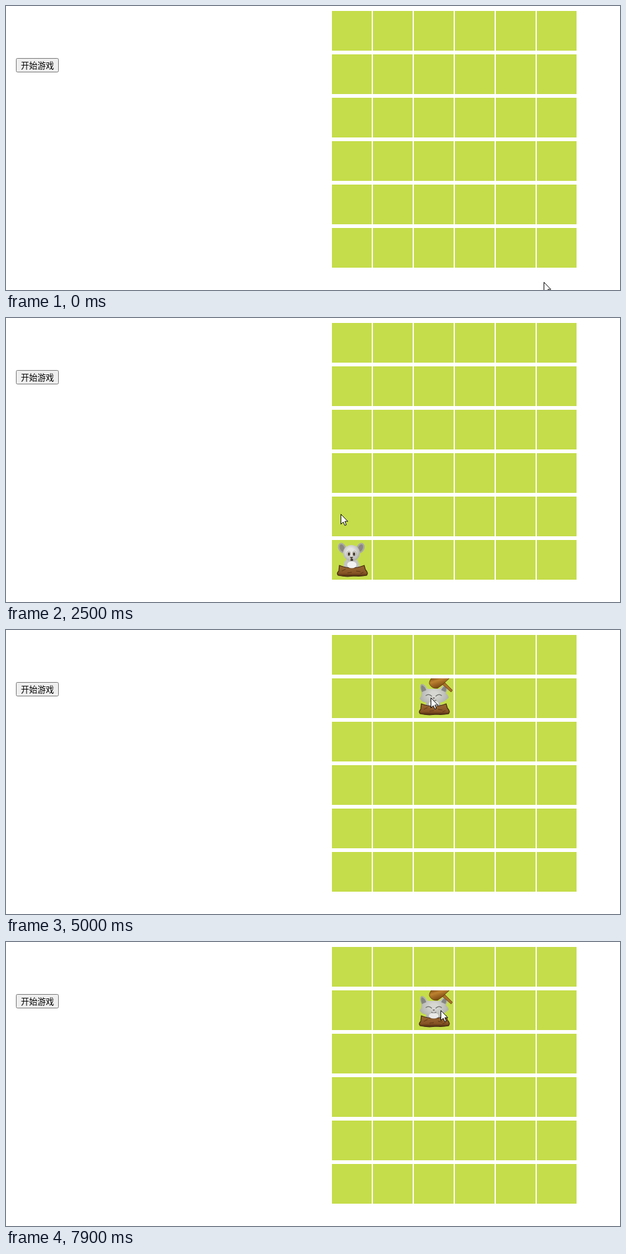
Write an HTML page that moves like this. It is 989x458 px and loops after 7.99 s.

```html
<!DOCTYPE html>
<html lang="zh">
<head>
<meta charset="utf-8">
<style>
html, body { margin: 0; width: 100%; height: 100%; overflow: hidden; background: #fff; }
svg { display: block; width: 989px; height: 458px; }
text { font: 300 13.333px "Noto Sans CJK SC", "Noto Sans CJK", sans-serif; }
</style>
</head>
<body>
<svg viewBox="0 0 989 458">
  <defs>
    <clipPath id="cellClip"><rect width="64" height="64"/></clipPath>
    <radialGradient id="fur" cx=".45" cy=".4" r=".65">
      <stop offset=".3" stop-color="#e4e4e2"/><stop offset="1" stop-color="#a9a9a6"/>
    </radialGradient>
    <radialGradient id="greyFur" cx=".5" cy=".45" r=".6">
      <stop offset=".2" stop-color="#d6d6d3"/><stop offset="1" stop-color="#a8a8a4"/>
    </radialGradient>
    <linearGradient id="soil" x2="0" y2="1">
      <stop offset="0" stop-color="#9a6a34"/><stop offset=".7" stop-color="#875425"/><stop offset="1" stop-color="#4a2a10"/>
    </linearGradient>
    <linearGradient id="wood" x1="0" y1="0" x2=".6" y2="1">
      <stop offset="0" stop-color="#6f3d0c"/><stop offset=".4" stop-color="#bd822f"/><stop offset="1" stop-color="#6b3a0c"/>
    </linearGradient>
    <g id="mound">
      <path d="M12 41Q32 49 52 41L54 48Q59 53 56 57Q46 59 36 58Q22 60 10 57Q7 54 11 50Z" fill="url(#soil)" stroke="#432712" stroke-width="1.2"/>
      <path d="M16 50l6-3M25 53l7-1M39 50l7 1M46 54l5-2" stroke="#5c3814" fill="none"/>
    </g>
  </defs>

  <rect id="button" x="16.5" y="84.5" width="68" height="22" rx="2"/>
  <text x="24" y="101">开始游戏</text>
  <g id="grid" fill="#c5dd4a"></g>

  <g id="mole" clip-path="url(#cellClip)">
    <g id="awake">
      <g fill="#8b8780" stroke="#aaa9a4" stroke-width="2.5">
        <ellipse cx="16.5" cy="13" rx="5" ry="7.5" transform="rotate(-24 16.5 13)"/>
        <ellipse cx="46" cy="13" rx="5" ry="7.5" transform="rotate(24 46 13)"/>
      </g>
      <path d="M19 46Q18 34 24 31H39Q45 35 44 46Z" fill="#c4c4c1"/>
      <ellipse cx="31.5" cy="21" rx="13.5" ry="13" fill="url(#fur)"/>
      <g fill="#f0efe8" stroke="#77736b" stroke-width=".6">
        <ellipse cx="27" cy="22" rx="2.7" ry="4"/><ellipse cx="36" cy="22" rx="2.7" ry="4"/>
      </g>
      <g fill="#3b3021">
        <ellipse cx="27.3" cy="22.5" rx="1.6" ry="2.7"/><ellipse cx="35.7" cy="22.5" rx="1.6" ry="2.7"/>
        <path d="M28.5 27.5h6l-3 3z"/><path d="M30 30.5h4v3h-4z"/>
      </g>
      <use href="#mound"/>
      <ellipse cx="32" cy="40" rx="7.5" ry="5.5" fill="#f3f3f3"/>
    </g>
    <g id="struck">
      <path d="M12 23Q8 12 12 9Q17 8 22 17L42 17Q49 8 53 10Q56 15 52 24Q59 31 54 33Q48 39 42 39L44 46H19L20 39Q12 38 9 32Q12 31 12 23Z" fill="url(#greyFur)"/>
      <path d="M13 22Q10 13 13 11Q18 13 20 19ZM51 22Q54 13 51 12Q46 14 44 19Z" fill="#858581"/>
      <path d="M19 28q5-4 10 1M35 29q5-5 10-1M28 35q4 3 8 0" fill="none" stroke="#6b6b67" stroke-width="1.2"/>
      <path d="M30 31h4l-2 2z" fill="#5a5048"/>
      <use href="#mound"/>
      <ellipse cx="32" cy="41" rx="8" ry="4.5" fill="#e9e9e7"/>
      <path d="M47 4l15 15-2 3-16-14z" fill="#a8702b" stroke="#6d420f" stroke-width=".8"/>
      <path d="M30-2Q24 4 25 9Q29 17 38 16L45 11L57 0V-2Z" fill="url(#wood)" stroke="#5a330d" stroke-width=".8"/>
    </g>
  </g>

  <circle id="flash" r="12" fill="#ffee00" fill-opacity=".5"/>
  <path id="cursor" d="M.5.5V16.5L4.2 13L6.8 18.5L9.2 17.5L6.8 12H11.6Z" fill="#fff" stroke="#000"/>
</svg>
<script>
const LOOP = 7990, UPDATE = 78.33;
const FIRST_POP = 2080, POP_EVERY = 1000, PRESS_TIME = 130, START_PRESS = 960;
const $ = id => document.getElementById(id);

const cellX = i => 525 + 66 * (i % 6);
const cellY = i => 8 + 70 * Math.floor(i / 6);

function set(id, attributes) {
  for (const name in attributes) $(id).setAttribute(name, attributes[name]);
}
const show = (id, on) => set(id, { visibility: on ? 'visible' : 'hidden' });
const place = (id, x, y) => set(id, { transform: `translate(${x} ${y})` });

$('grid').innerHTML = Array.from({ length: 36 }, (_, i) =>
  `<rect x="${cellX(i)}" y="${cellY(i)}" width="64" height="64"/>`).join('');

// one mole per POP_EVERY, struck when its press is released
const moles = [
  { cell: 30, press: 2830 }, { cell: 10, press: 3830 }, { cell: 8, press: 4790 },
  { cell: 31, press: 5780 }, { cell: 3, press: 6910 }, { cell: 8, press: 7590 }
];

// the pointer rests between moves
const home = { x: 866, y: 445 };
const moves = [
  { from: 20, to: 860, x: 57, y: 104 },
  { from: 1090, to: 1800, x: 434, y: 98 },
  { from: 1800, to: 2820, x: 570, y: 380 },
  { from: 3125, to: 3680, x: 809, y: 103 },
  { from: 4240, to: 4700, x: 684, y: 109 },
  { from: 5320, to: 5780, x: 616, y: 386 },
  { from: 5950, to: 6815, x: 740, y: 46 },
  { from: 7055, to: 7590, x: 702, y: 102 },
  { from: 7830, to: 7905, x: 700, y: 110 }
];

const ease = u => u * u * (3 - 2 * u);

function pointerAt(t) {
  let { x, y } = home;
  for (const move of moves) {
    const u = ease(Math.min(1, Math.max(0, (t - move.from) / (move.to - move.from))));
    x += (move.x - x) * u;
    y += (move.y - y) * u;
  }
  return [Math.round(x), Math.round(y)];
}

function draw(ms) {
  // the picture advances in discrete screen updates
  const t = Math.min(101, Math.floor((ms + 18) / UPDATE)) * UPDATE;
  const [x, y] = pointerAt(t);
  const pressed = [START_PRESS, ...moles.map(m => m.press)].some(p => t >= p && t < p + PRESS_TIME);
  place('cursor', x, y);
  place('flash', x, y);
  show('flash', pressed);

  const over = x >= 16 && x < 85 && y >= 84 && y < 107;
  const [fill, stroke] = !over ? ['#efefef', '#767676'] : pressed ? ['#f5f5f5', '#8d8d8d'] : ['#e5e5e5', '#4f4f4f'];
  set('button', { fill, stroke });

  const mole = moles[Math.floor((t - FIRST_POP) / POP_EVERY)];
  const hit = mole && t >= mole.press + PRESS_TIME;
  show('awake', mole && !hit);
  show('struck', hit);
  if (mole) place('mole', cellX(mole.cell), cellY(mole.cell));
}

const start = performance.now();
function tick() {
  draw((performance.now() - start) % LOOP);
  requestAnimationFrame(tick);
}
tick();
</script>
</body>
</html>
```
